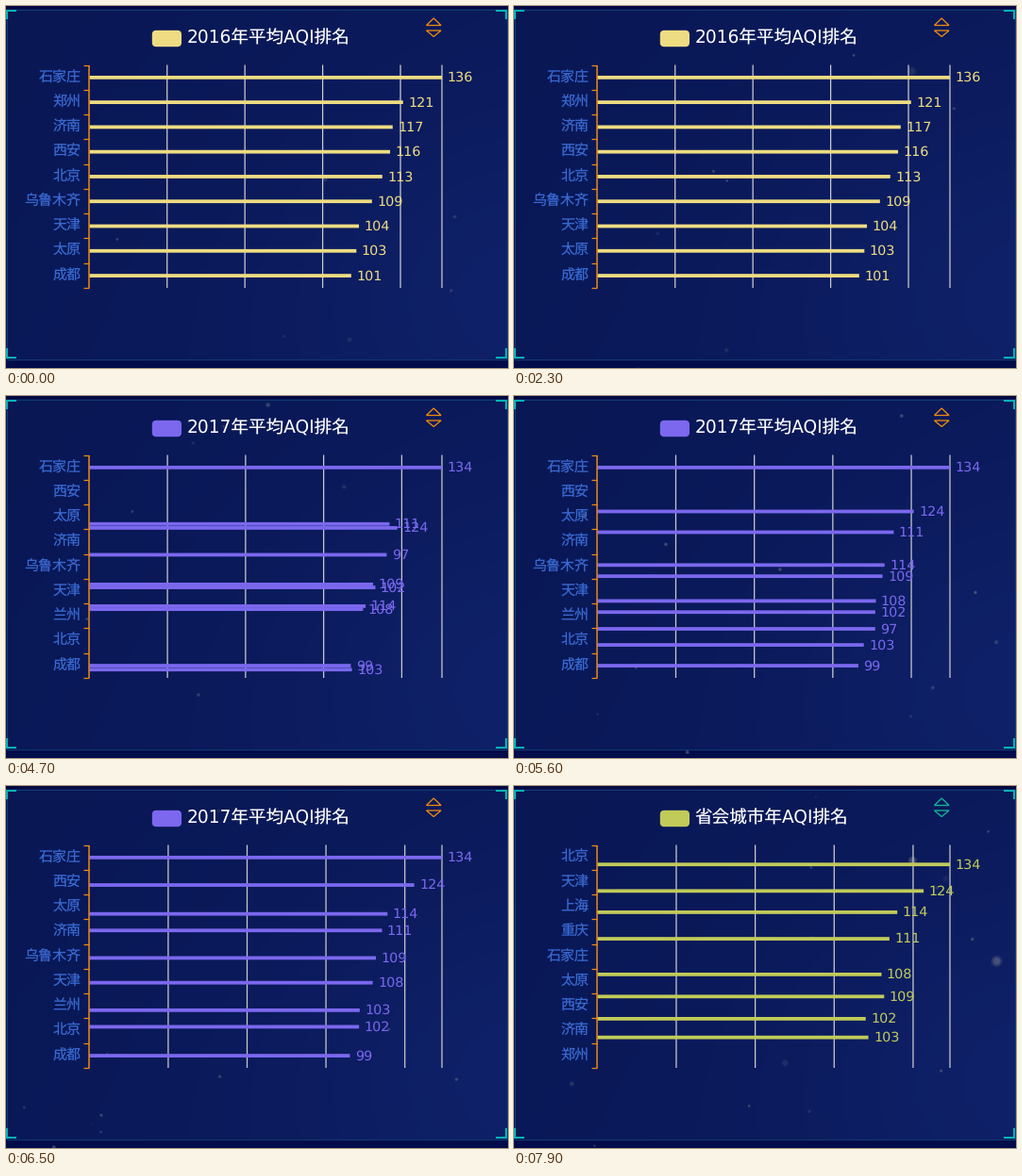
Animation of 532x384 px, one loop 8 s. Source, as a matplotlib script:

```python
import numpy as np
import matplotlib.pyplot as plt
from matplotlib.animation import FuncAnimation
from matplotlib.patches import FancyBboxPatch, Polygon, Rectangle

W, H, DPI = 532, 384, 100
FRAMES, STEP = 80, 100
PX = 72 / DPI
LEFT, RIGHT, TOP, BOTTOM = 88.3, 462, 62.5, 299
SHOWN = 9
ROW = (BOTTOM - TOP) / SHOWN
MOVE = 2.71  # seconds a re-ranking takes

plt.rcParams["font.family"] = ["DejaVu Sans", "Noto Sans CJK JP"]
plt.rcParams["text.hinting"] = "none"

TEAL, ORANGE, GREEN, BLUE = "#05b4b4", "#f08a10", "#12b89a", "#3868cf"


def ranking(names, values):
    return dict(zip(names.split(), values))


AQI_2016 = ranking("石家庄 郑州 济南 西安 北京 乌鲁木齐 天津 太原 成都 兰州",
                   (136, 121, 117, 116, 113, 109, 104, 103, 101, 100))
AQI_2017 = ranking("石家庄 西安 太原 济南 乌鲁木齐 天津 兰州 北京 成都 沈阳 郑州",
                   (134, 124, 114, 111, 109, 108, 103, 102, 99, 98, 97))
CAPITALS = ("北京 天津 上海 重庆 石家庄 太原 西安 济南 郑州 沈阳 长春 哈尔滨 "
            "南京 杭州 合肥 南昌 福州 武汉 长沙 成都 贵阳 昆明 广州 海口 "
            "兰州 西宁 银川 乌鲁木齐").split()
AQI_CAPITALS = {c: AQI_2017.get(c, 0) for c in CAPITALS}


class Chart:
    def __init__(self, title, color, icon, start, data):
        self.title, self.color, self.icon = title, color, icon
        self.start, self.data = start, data
        self.names = list(data)
        self.top = max(data.values())

    def x(self, value):
        return LEFT + (RIGHT - LEFT) * value / self.top

    def end(self, city):
        return self.x(self.data[city])

    def y(self, city):
        return row_y(self.names.index(city))


def row_y(row):
    return TOP + ROW * (row + 0.5)


CHARTS = [
    Chart("2016年平均AQI排名", "#eedc82", ORANGE, -MOVE, AQI_2016),
    Chart("2017年平均AQI排名", "#7b68ee", ORANGE, 3.94, AQI_2017),
    Chart("省会城市年AQI排名", "#c1cb5a", GREEN, 7.71, AQI_CAPITALS),
]


def backdrop():
    y, x = np.mgrid[0:H, 0:W]
    glow = np.exp(-(((x - 540) / 240) ** 2 + ((y - 300) / 190) ** 2))
    mix = np.clip(0.25 * x / W + 0.15 * y / H + 0.6 * glow, 0, 1)[..., None]
    img = np.array([9, 23, 85]) * (1 - mix) + np.array([15, 33, 105]) * mix
    img[:3] = (2, 8, 66)
    img[375:] = (3, 12, 74)
    return img / 255


def line(xs, ys, color, width, z, **style):
    return ax.plot(xs, ys, color=color, lw=width * PX, zorder=z,
                   solid_capstyle="butt", solid_joinstyle="miter", **style)[0]


def split(x=0):
    return line([x, x], [TOP, BOTTOM], "#cccccc", 1.25, 2, snap=False)


def text(x, y, s, size, color, ha="left"):
    return ax.text(x, y, s, size=size * PX, color=color, ha=ha,
                   va="baseline", zorder=6)


fig = plt.figure(figsize=(W / DPI, H / DPI), dpi=DPI)
ax = fig.add_axes([0, 0, 1, 1])
ax.imshow(backdrop(), extent=(0, W, H, 0), aspect="auto",
          interpolation="nearest", zorder=0)
ax.set(xlim=(0, W), ylim=(H, 0))
ax.axis("off")

# panel frame with corner brackets
line([0.5, 530.5, 530.5, 0.5, 0.5], [3.5, 3.5, 374.5, 374.5, 3.5],
     "#0f3a70", 1, 1)
for cx, dx in ((1, 10), (530, -11)):
    for cy, dy in ((5, 9), (373, -10)):
        line([cx + dx, cx, cx], [cy, cy, cy + dy], TEAL, 2, 2)

# drifting lights, mostly small and towards the right
rng = np.random.default_rng(12)
COUNT = 90
peak = rng.uniform(-0.3, 8.3, COUNT)
home = np.column_stack([W * rng.random(COUNT) ** 0.7, H * rng.random(COUNT)])
drift = rng.normal(0, 20, (COUNT, 2))
radius = 1.3 + rng.exponential(0.7, COUNT)
halo = ax.scatter(*home.T, linewidths=0, zorder=1.5)
core = ax.scatter(*home.T, linewidths=0, zorder=1.6)

# axes
splits = [split() for _ in range(4)]
split(RIGHT)
for i in range(SHOWN + 1):
    y = TOP + i * ROW
    line([82, 88], [y, y], ORANGE, 1.25, 5)
line([88, 88], [TOP, BOTTOM], ORANGE, 1.5, 5)
labels = [text(79.5, row_y(i) + 4.6, "", 15, BLUE, "right")
          for i in range(SHOWN)]

# legend and sort icon
key = ax.add_patch(FancyBboxPatch((154.8, 25.8), 31.2, 17.4, lw=0, zorder=4,
                                  boxstyle="round,pad=0,rounding_size=4.4"))
title = text(191.3, 39.3, "", 18.6, "white")
icons = [ax.add_patch(Polygon([(445.5, base), (461, base), (453.2, tip)],
                              fill=False, lw=1.3 * PX, zorder=4))
         for base, tip in ((20.5, 13), (26, 32.5))]

bars = {c: ax.add_patch(Rectangle((LEFT, 0), 1, 3.8, lw=0, zorder=4,
                                  snap=False)) for c in AQI_2016}
values = {c: text(0, 0, "", 14.4, "white") for c in AQI_2016}


def show_lights(t):
    age = t - peak
    fade = np.clip(1 - np.abs(age) / 0.6, 0, 1)
    spots = home + drift * age[:, None]
    for dots, scale, alpha in ((halo, 1.15, 0.17), (core, 0.75, 0.22)):
        dots.set_offsets(spots)
        dots.set_sizes((2 * radius * scale * PX) ** 2)
        dots.set_facecolors([(0.72, 0.72, 0.66, alpha * f) for f in fade])


def draw(i):
    t = i * STEP / 1000
    now = max(k for k, chart in enumerate(CHARTS) if t >= chart.start)
    new, old = CHARTS[now], CHARTS[max(now - 1, 0)]
    p = min((t - new.start) / MOVE, 1)

    def blend(a, b):
        return a + (b - a) * p

    title.set_text(new.title)
    key.set_facecolor(new.color)
    for icon in icons:
        icon.set_edgecolor(new.icon)
    for label, name in zip(labels, new.names):
        label.set_text(name)
    for k, mark in enumerate(splits, 1):
        x = blend(old.x(30 * k), new.x(30 * k))
        mark.set_xdata([x, x])

    for city in bars:
        x = blend(old.end(city), new.end(city))
        y = blend(old.y(city), new.y(city))
        inside = y < BOTTOM
        bars[city].set(y=y - 1.7, width=x - LEFT, facecolor=new.color,
                       visible=inside)
        values[city].set(x=x + 5.4, y=y + 4.6, text=str(new.data[city]),
                         color=new.color, visible=inside)
    show_lights(t)
    return []


anim = FuncAnimation(fig, draw, frames=FRAMES, interval=STEP, repeat=True,
                     repeat_delay=0, blit=False)
plt.show()
```
